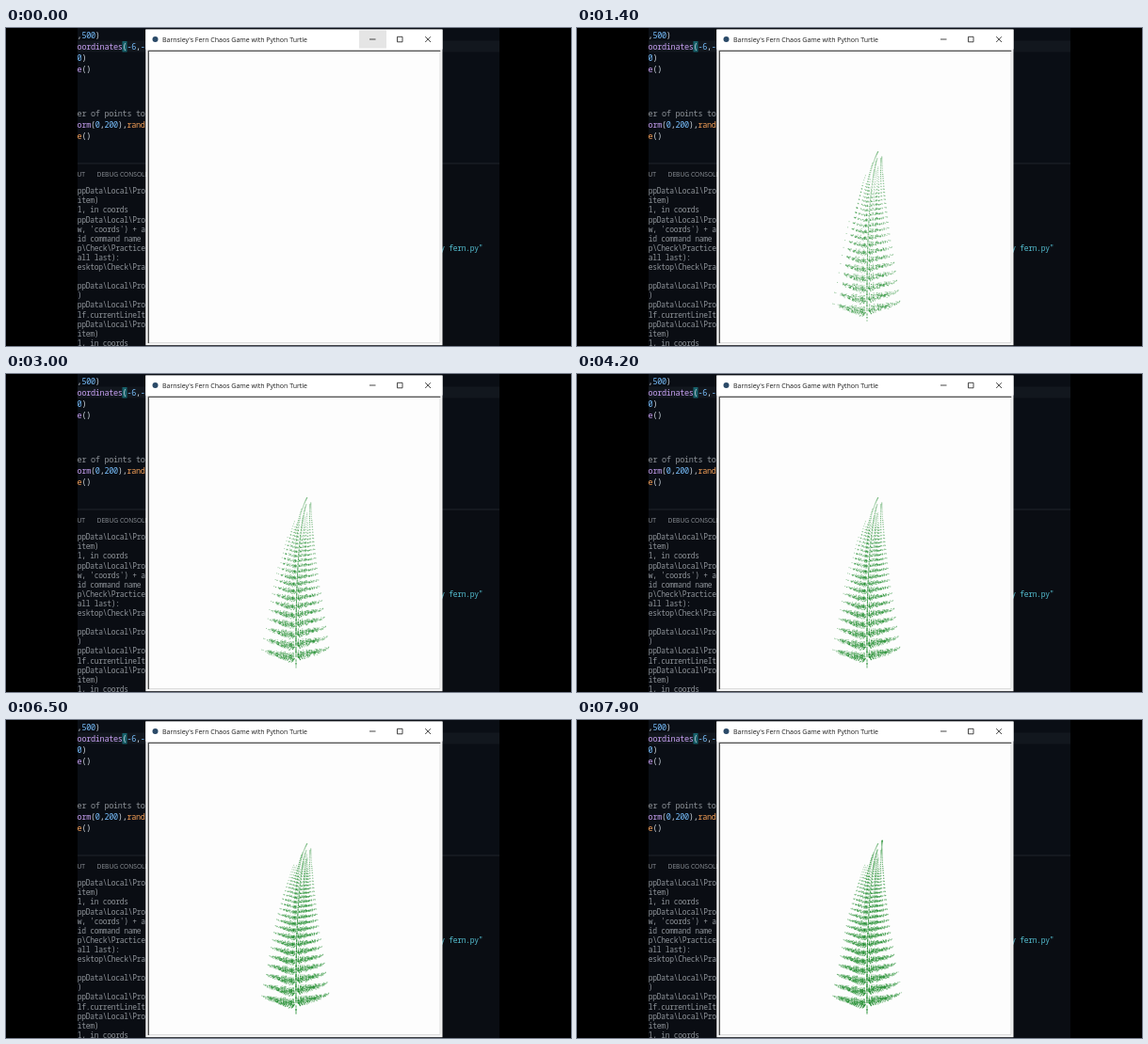
Recreate the animation shown at these times as an HTML page with a canvas. Size 600 by 338 pixels, loop 8000 ms.

```html
<!DOCTYPE html>
<html lang="en">
<head>
<meta charset="utf-8">
<title>Fern chaos game</title>
<style>
  html, body { margin: 0; width: 100%; height: 100%; overflow: hidden; background: #000; }
  svg, canvas { position: absolute; left: 0; top: 0; width: 600px; height: 338px; }
  .code { font: 8.5px "Noto Sans Mono", "DejaVu Sans Mono", monospace; letter-spacing: -.3px; }
  .term { font: 8px "Noto Sans Mono", "DejaVu Sans Mono", monospace; letter-spacing: -.3px; }
  .ui { font: 7px "Open Sans", "Noto Sans", sans-serif; }
  .tab { font-size: 6.7px; }
</style>
</head>
<body>
<svg viewBox="0 0 600 338">
  <clipPath id="screen"><rect x="76" width="448" height="338"/></clipPath>
  <g clip-path="url(#screen)">
    <rect x="76" width="448" height="144" fill="#0a0e15"/>
    <rect x="76" y="13.5" width="448" height="12" fill="#12171e"/>
    <rect x="76" y="144" width="448" height="194" fill="#0a0d13"/>
    <rect x="76" y="143.5" width="448" height="1" fill="#20252c"/>
    <rect x="123.5" y="14" width="5" height="11.5" fill="#17606a"/>
    <g id="text"></g>
  </g>
  <rect x="148.3" y="1.6" width="315.2" height="335.6" fill="#f4f4f4"/>
  <rect x="148.3" y="1.6" width="315.2" height="21" fill="#fff"/>
  <rect id="hover" x="375" y="2.5" width="29" height="19" fill="#e5e5e5"/>
  <circle cx="158.5" cy="12" r="3" fill="#2b4a68"/>
  <text class="ui" x="166" y="14.6" fill="#1c1c1c">Barnsley's Fern Chaos Game with Python Turtle</text>
  <path d="M386 12h6.5M415.5 9.3h5.5v5.5h-5.5zM445.2 9.2l5.8 5.8M451 9.2l-5.8 5.8" fill="none" stroke="#333" stroke-width=".9"/>
  <rect x="151" y="24" width="310.5" height="311" fill="#fdfdfd"/>
  <path d="M461 24.5v310h-310" fill="none" stroke="#dcdcdc"/>
  <path d="M151.3 335v-310.6h310" fill="none" stroke="#505050" stroke-width="1.4"/>
</svg>
<canvas id="fern" width="600" height="338"></canvas>
<script>
const PURPLE = '#c9a2f5', BLUE = '#79c0ff', ORANGE = '#f5a057', PLAIN = '#c9d1d9', GREY = '#8f949a';

const SVG = 'http://www.w3.org/2000/svg';
const textLayer = document.getElementById('text');

// Spans are [text, colour] pairs.
function line(cls, x, y, ...spans) {
  const row = document.createElementNS(SVG, 'text');
  row.setAttribute('class', cls);
  row.setAttribute('x', x);
  row.setAttribute('y', y);
  for (const [str, fill] of spans) {
    const span = document.createElementNS(SVG, 'tspan');
    span.textContent = str;
    span.setAttribute('fill', fill);
    row.append(span);
  }
  textLayer.append(row);
}

line('code', 75.6, 10.9, [',', PLAIN], ['500', BLUE], [')', PLAIN]);
line('code', 75.6, 22.6, ['oordinates', PURPLE], ['(', PLAIN], ['-6', BLUE], [',', PLAIN], ['-1', BLUE]);
line('code', 75.6, 34.6, ['0', BLUE], [')', PLAIN]);
line('code', 75.6, 46.6, ['e', PURPLE], ['()', PLAIN]);
line('code', 75.6, 94.4, ['er of points to', GREY]);
line('code', 75.6, 106.4, ['orm', PURPLE], ['(', PLAIN], ['0', BLUE], [',', PLAIN], ['200', BLUE], ['),', PLAIN], ['rand', ORANGE]);
line('code', 75.6, 118.3, ['e', ORANGE], ['()', PLAIN]);

line('ui tab', 75.5, 158.4, ['UT', GREY]);
line('ui tab', 96.5, 158.4, ['DEBUG CONSOLE', GREY]);

const path = 'ppData\\Local\\Pro';
[
  path, 'item)', '1, in coords', path, "w, 'coords') + a", 'id command name',
  'p\\Check\\Practice', 'all last):', 'esktop\\Check\\Pra', '', path, ')', path,
  'lf.currentLineIt', path, 'item)', '1, in coords'
].forEach((str, i) => line('term', 75.8, 176.2 + i * 10.1, [str, GREY]));
line('term', 461.2, 236.8, ['y fern.py"', '#55bfd2']);

// Affine maps: a, b, c, d, e, f and cumulative probability.
const MAPS = [
  [0, 0, 0, 0.25, 0, -0.4, 0.007],
  [0.95, 0.005, -0.005, 0.93, -0.002, 0.5, 0.875],
  [0.035, -0.2, 0.16, 0.04, -0.09, 0.02, 0.938],
  [-0.04, 0.2, 0.16, 0.04, 0.083, 0.12, 1]
];
const MAX = 7000;

function random(seed) {
  return () => {
    seed = (seed + 0x6D2B79F5) | 0;
    let t = Math.imul(seed ^ (seed >>> 15), 1 | seed);
    t = (t + Math.imul(t ^ (t >>> 7), 61 | t)) ^ t;
    return ((t ^ (t >>> 14)) >>> 0) / 4294967296;
  };
}

function chaosGame() {
  const rnd = random(11), points = [];
  let x = 0, y = 0;
  while (points.length < MAX) {
    const r = rnd();
    const [a, b, c, d, e, f] = MAPS.find(m => r < m[6]);
    [x, y] = [a * x + b * y + e, c * x + d * y + f];
    points.push([308 + 25 * x, 302.3 - 24.8 * y]);
  }
  return points;
}

// [time, points drawn]; equal counts are pauses.
const GROWTH = [
  [0, 0], [500, 1700], [1400, 3200], [3000, 4500], [3500, 4800], [3950, 4800],
  [4200, 5200], [5700, 6000], [5950, 6000], [6500, 6350], [7100, 6650],
  [7250, 6650], [7900, MAX]
];

function countAt(t) {
  const i = GROWTH.findIndex(([time]) => time >= t);
  if (i < 1) return i ? MAX : 0;
  const [t0, n0] = GROWTH[i - 1], [t1, n1] = GROWTH[i];
  return Math.round(n0 + (n1 - n0) * (t - t0) / (t1 - t0));
}

const LOOP = 8000, STEP = 100;
const points = chaosGame();
const ctx = document.getElementById('fern').getContext('2d');
const hover = document.getElementById('hover');
ctx.fillStyle = 'rgba(24, 136, 40, 0.42)';
let drawn = 0;

function render(time) {
  const t = Math.floor((time % LOOP) / STEP) * STEP;
  const count = countAt(t);
  if (count < drawn) {
    ctx.clearRect(0, 0, 600, 338);
    drawn = 0;
  }
  for (; drawn < count; drawn++) {
    const [x, y] = points[drawn];
    ctx.fillRect(x - 0.5, y - 0.5, 1, 1);
  }
  hover.style.display = t < STEP ? '' : 'none';
}

const start = performance.now();
function tick() {
  render(performance.now() - start);
  requestAnimationFrame(tick);
}
tick();
</script>
</body>
</html>
```
